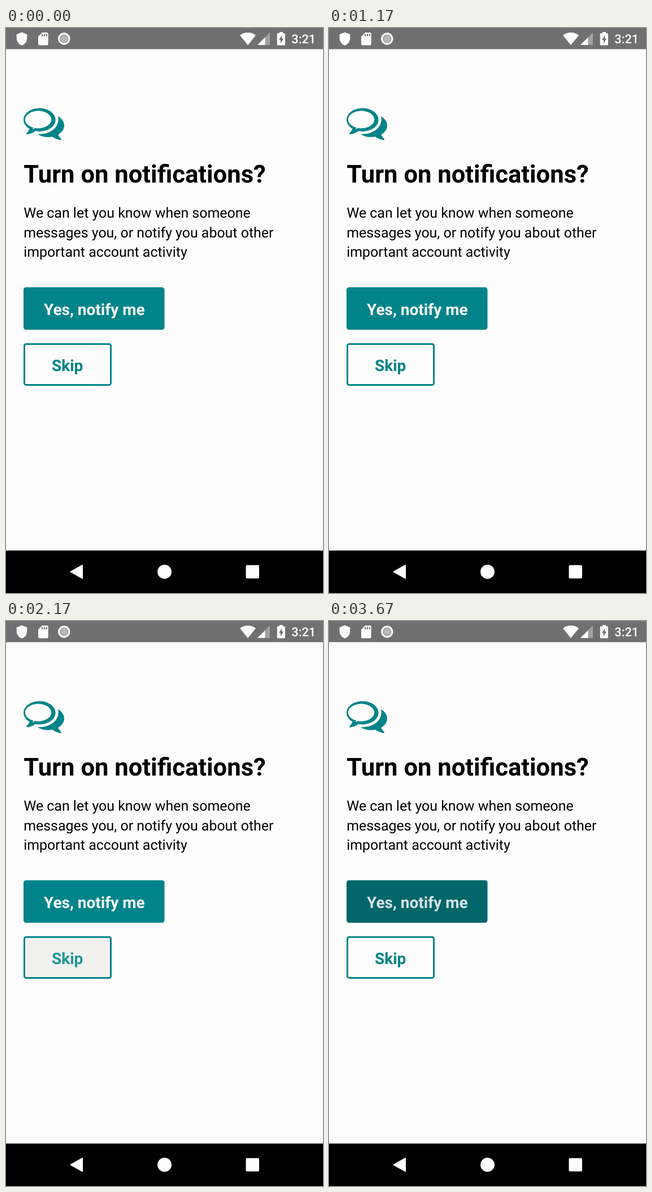
Recreate the animation shown at these times as an HTML page. Size 561x998 px, loop 4170 ms.

```html
<!DOCTYPE html>
<html lang="en">
<head>
<meta charset="utf-8">
<title>Notification prompt</title>
<style>
  html, body { margin: 0; width: 100%; height: 100%; overflow: hidden; background: #fdfdfd; }
  svg { display: block; width: 100%; height: 100%; font-family: Roboto, sans-serif; text-rendering: geometricPrecision; }
  .bold { font-weight: 700; }
  .label { font-weight: 700; font-size: 28px; }
  .teal { fill: #008489; }
  #yes rect { fill: #008489; }
  #yes text { fill: #fdfdfd; }
  #yes.pressed rect { fill: #00666a; }
  #yes.pressed text { fill: #d5e3e5; }
  #skip rect { fill: #fdfdfd; stroke: #008489; stroke-width: 3; }
  #skip text { fill: #008489; }
  #skip.pressed rect { fill: #f1f1f0; }
  #skip.pressed text { fill: #209698; }
</style>
</head>
<body>
<svg viewBox="0 0 561 998">
  <rect width="561" height="998" fill="#fdfdfd"/>

  <!-- Status bar -->
  <rect width="561" height="37.4" fill="#707070"/>
  <g fill="#fdfdfd">
    <path d="M28 7.5L37.3 11.3V18C37.3 24.2 33.4 29 28 30.8C22.6 29 18.7 24.2 18.7 18V11.3Z"/>
    <path d="M64 8H72.5Q74.7 8 74.7 10.2V28.3Q74.7 30.5 72.5 30.5H59.2Q57 30.5 57 28.3V15Z"/>
    <path d="M64.2 10.5v4.3M68 10.5v4.3M71.8 10.5v4.3" stroke="#707070" stroke-width="2"/>
    <circle cx="102.8" cy="19" r="10.7"/>
    <circle cx="102.8" cy="19" r="6.8" fill="#b9b9b9" stroke="#989898" stroke-width="1.6"/>
    <path d="M428 30.3L414 13Q420 8 428 8T442 13Z"/>
    <path d="M467 8V30H445Z" opacity=".35"/>
    <path d="M458.5 16.5V30H445Z"/>
    <path d="M484 9.3V7H490V9.3H492.5Q494 9.3 494 10.8V29Q494 30.5 492.5 30.5H481.2Q479.7 30.5 479.7 29V10.8Q479.7 9.3 481.2 9.3Z"/>
    <path d="M488.2 12.8L483 21.2H486V27.3L491 18.8H488.2Z" fill="#707070"/>
    <text x="505.3" y="27.2" font-size="21.8" font-weight="500">3:21</text>
  </g>

  <!-- Chat bubbles -->
  <g class="teal" transform="translate(31 131.2) scale(.0402)">
    <path fill-rule="evenodd" d="M528 1264A704 512 0 1 0 266 1169Q220 1272 128 1366Q122 1408 164 1408Q370 1380 528 1264Z
      M427 1114L392 1198L454 1159L498 1128L551 1138A576 384 0 1 0 427 1114Z"/>
    <path d="M1526 1425Q1560 1510 1643 1591Q1675 1625 1664 1640Q1655 1664 1629 1660Q1420 1630 1265 1515Q1175 1531 1089 1531
      Q818 1531 617 1399Q675 1403 705 1403Q866 1403 1014 1358T1278 1229Q1403 1137 1470 1017T1537 763
      Q1537 686 1514 611Q1643 682 1718 789T1793 1019Q1793 1139 1722 1243T1526 1425Z"/>
  </g>

  <text class="bold" x="31.2" y="273" font-size="43.6">Turn on notifications?</text>
  <g font-size="24.93">
    <text x="31.2" y="335.4">We can let you know when someone</text>
    <text x="31.2" y="369.7">messages you, or notify you about other</text>
    <text x="31.2" y="404">important account activity</text>
  </g>

  <g id="yes">
    <rect x="31" y="458" width="249.5" height="75" rx="4.5"/>
    <text class="label" x="67" y="507">Yes, notify me</text>
  </g>
  <g id="skip">
    <rect x="32.5" y="558.2" width="153" height="72.3" rx="3.2"/>
    <text class="label" x="81" y="605.6">Skip</text>
  </g>

  <!-- Navigation bar -->
  <rect y="923" width="561" height="75"/>
  <g fill="#fdfdfd">
    <path d="M114.5 960.5L135 949V972Z" stroke="#fdfdfd" stroke-width="2" stroke-linejoin="round"/>
    <circle cx="280.5" cy="960.5" r="12.5"/>
    <rect x="424.5" y="948.8" width="23.5" height="23.5" rx="2"/>
  </g>
</svg>
<script>
  const LOOP = 4170;
  // Press intervals in ms for each button
  const presses = {
    yes: [[1290, 2080], [3670, LOOP]],
    skip: [[2170, 2670], [2790, 3550]]
  };
  const start = performance.now();

  function draw(now) {
    const t = Math.max(0, now - start) % LOOP;
    for (const id in presses) {
      const down = presses[id].some(([from, to]) => t >= from && t < to);
      document.getElementById(id).classList.toggle("pressed", down);
    }
    requestAnimationFrame(draw);
  }
  draw(start);
</script>
</body>
</html>
```
